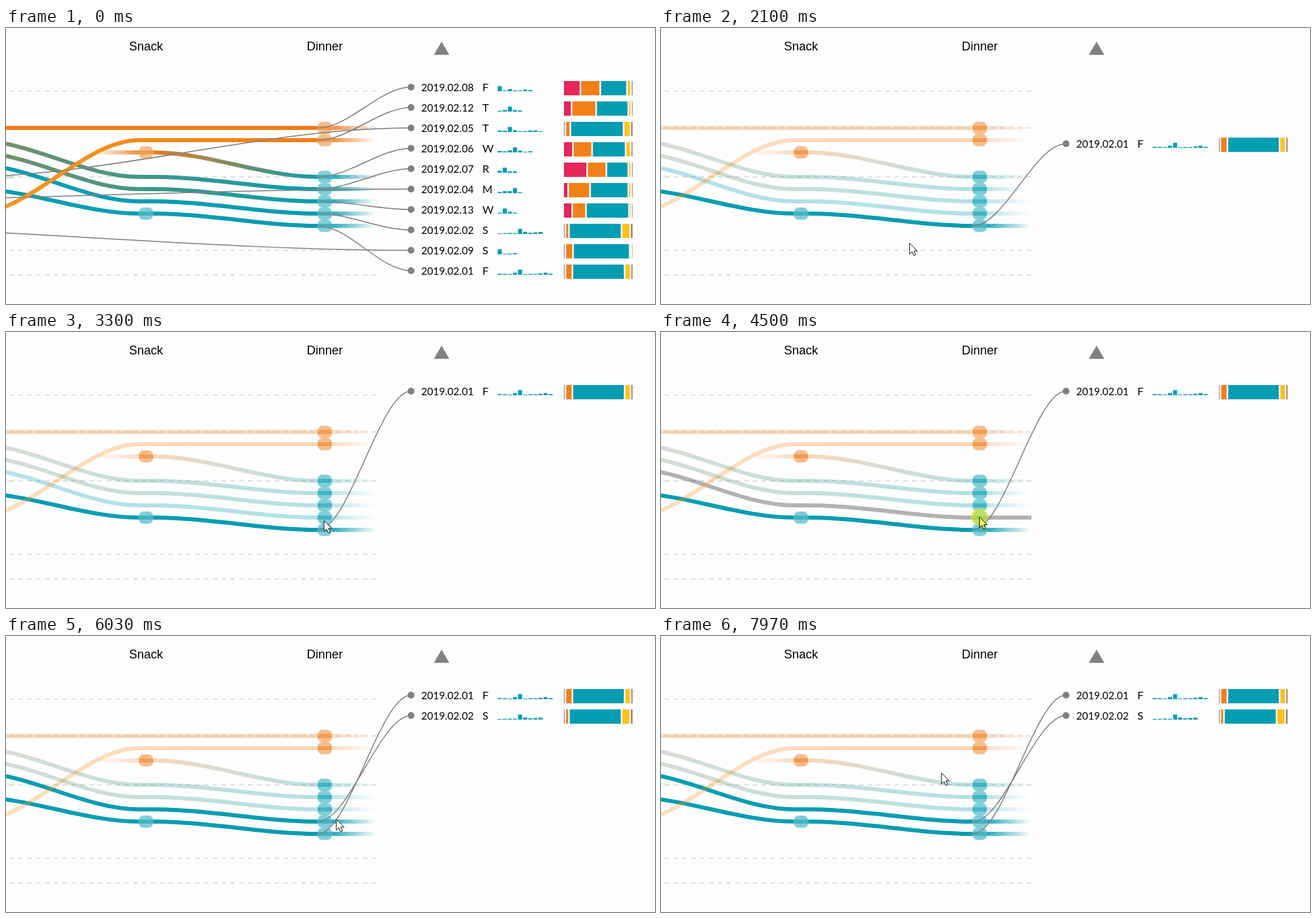
An HTML page for the animation above (8000 ms loop, 955 px wide and 406 px high).

```html
<!DOCTYPE html>
<html lang="en">
<head>
<meta charset="utf-8">
<title>Meal flows</title>
<style>
html, body { margin: 0; width: 100%; height: 100%; overflow: hidden; background: #fefefe; }
svg { display: block; width: 955px; height: 406px; }
.head { font: 18px "Liberation Sans", Arial, sans-serif; text-anchor: middle; }
.date { font: 15.1px Lato, sans-serif; }
.day { font: 16px Lato, sans-serif; }
.flow { fill: none; stroke-width: 6; }
.link { fill: none; stroke: #808080; stroke-width: 1.5; }
.grid { stroke: #e0e0e0; stroke-width: 2; stroke-dasharray: 7 6; }
</style>
</head>
<body>
<svg id="stage" viewBox="0 0 955 406" xmlns="http://www.w3.org/2000/svg"></svg>
<script>
const LOOP = 8000;
const TEAL = '#039db1', ORANGE = '#f07d1a', OLIVE = '#7d9062', AMBER = '#f7991c', GREY = '#808080';
const FADE = 76, HALF = 10;
const [MORNING, LUNCH, SNACK, DINNER] = [0, 1, 2, 3];
const colX = i => -320 + 263 * i;
const slotY = k => 93 + 18 * k;
const rowY = i => 87 + 30 * i;
const stage = document.getElementById('stage');

function add(parent, tag, attrs = {}, text) {
  const el = document.createElementNS('http://www.w3.org/2000/svg', tag);
  for (const k in attrs) el.setAttribute(k, attrs[k]);
  if (text) el.textContent = text;
  parent.appendChild(el);
  return el;
}
const clamp = v => Math.max(0, Math.min(1, v));
const ramp = (t, from, to) => clamp((t - from) / (to - from));
const smooth = u => u * u * (3 - 2 * u);
const cubic = u => u < .5 ? 4 * u ** 3 : 1 - 4 * (1 - u) ** 3;
// A bezier that follows smooth() exactly
const bend = (x0, y0, x1, y1) => {
  const d = (x1 - x0) / 3;
  return `C${x0 + d},${y0} ${x1 - d},${y1} ${x1},${y1}`;
};

// One day per row: date, first column, slot per column, colours at both ends,
// widths of the stacked bar, number of small bars and which is the tallest
const days = [
  ['02.08', LUNCH, [3, 3, 3], ORANGE, ORANGE, [23, 27, 37], 7, 0],
  ['02.12', LUNCH, [10, 4, 4], AMBER, ORANGE, [10, 34, 45], 5, 2],
  ['02.05', LUNCH, [7], TEAL, TEAL, [1, 5, 76], 9, 2],
  ['02.06', SNACK, [5, 7], ORANGE, TEAL, [12, 26, 47], 7, 3],
  ['02.07', LUNCH, [4, 7, 8], OLIVE, TEAL, [33, 26, 30], 4, 1],
  ['02.04', MORNING, [9], TEAL, TEAL, [5, 30, 54], 5, 3],
  ['02.13', LUNCH, [5, 8, 9], OLIVE, TEAL, [11, 18, 61], 4, 1],
  ['02.02', LUNCH, [6, 9, 10], TEAL, TEAL, [1, 3, 75], 9, 4],
  ['02.09', MORNING, [11], TEAL, TEAL, [1, 9, 81], 4, 0],
  ['02.01', LUNCH, [8, 10, 11], TEAL, TEAL, [1, 8, 74.5], 11, 4]
].map(([date, first, slots, head, tail, parts, count, peak], i) =>
  ({ date, first, ys: slots.map(slotY), head, tail, parts, count, peak, home: rowY(i) }));

const defs = add(stage, 'defs');
[SNACK, DINNER].forEach((c, i) =>
  add(stage, 'text', { class: 'head', x: colX(c), y: 33 }, ['Snack', 'Dinner'][i]));
add(stage, 'path', { d: 'M641 20L652.3 39.5H629.5Z', fill: GREY });
for (const k of [0, 3, 7, 13, 15]) add(stage, 'path', { class: 'grid', d: `M5 ${slotY(k)}H551` });

function makeFlow(day, i) {
  const { first, ys, head, tail } = day;
  const last = first + ys.length - 1;
  const x0 = colX(first) - (first === SNACK ? FADE : HALF), x1 = colX(last) + FADE;
  const id = 'flow' + i;
  const g = add(defs, 'linearGradient', { id, gradientUnits: 'userSpaceOnUse', x1: x0, x2: x1, y1: 0, y2: 0 });
  const stop = (x, color, alpha) =>
    add(g, 'stop', { offset: (x - x0) / (x1 - x0), 'stop-color': color, 'stop-opacity': alpha });
  if (first === SNACK) stop(x0, head, 0);
  stop(colX(first), head, 1);
  stop(colX(last), tail, 1);
  stop(x1, tail, 0);

  let d = `M${x0} ${ys[0]}`;
  ys.forEach((y, k) => {
    const x = colX(first + k);
    if (k) d += bend(colX(first + k - 1) + HALF, ys[k - 1], x - HALF, y);
    d += `H${x + HALF}`;
  });
  day.paint = `url(#${id})`;
  day.flow = add(stage, 'path', { class: 'flow', d: d + `H${x1}`, stroke: day.paint });
  day.end = [colX(last) - HALF, ys[ys.length - 1]];
  day.at = x => {
    if (x < x0 || x > x1) return -99;
    return ys.reduce((y, next, k) =>
      y + (next - y) * smooth(ramp(x, colX(first + k - 1) + HALF, colX(first + k) - HALF)));
  };
}
days.forEach(makeFlow);
stage.appendChild(days[1].flow);

function node(col, slot) {
  const x = colX(col) - 10.5, y = slotY(slot), fill = slot < 6 ? ORANGE : TEAL;
  const box = { x, y: y - 9, width: 21, height: 18, rx: 7 };
  add(stage, 'rect', { ...box, fill: '#fefefe' });
  add(stage, 'rect', { ...box, fill, opacity: .5 });
  add(stage, 'rect', { x, y: y - 3, width: 21, height: 6, fill, opacity: .5 });
}
for (const k of [5, 10]) node(SNACK, k);
for (const k of [3, 4, 7, 8, 9, 10, 11]) node(DINNER, k);

let seed = 7;
const random = () => (seed = seed * 16807 % 2147483647) / 2147483647;

function makeRow(day) {
  const { date, parts, count, peak } = day;
  const weekday = new Date(`2019-${date.replace('.', '-')}T00:00Z`).getUTCDay();
  day.row = add(stage, 'g');
  day.link = add(day.row, 'path', { class: 'link' });
  day.box = add(day.row, 'g');
  const rect = (x, y, width, height, fill) => add(day.box, 'rect', { x, y, width, height, fill });
  add(day.box, 'circle', { cx: 596, r: 5, fill: GREY });
  add(day.box, 'text', { class: 'date', x: 611, y: 6 }, '2019.' + date);
  add(day.box, 'text', { class: 'day', x: 701, y: 6 }, 'SMTWRFS'[weekday]);
  for (let k = 0; k < count; k++) {
    const h = k === peak ? 7.5 : 1 + 2.5 * random() ** 2;
    rect(723.5 + k * 7.5, 6 - h, 6, h, TEAL);
  }
  const gap = 2.3;
  const rest = 101 - 4 * gap - parts.reduce((a, b) => a + b);
  const tip = .5 + .15 * rest;
  const colors = [parts[0] > 1 ? '#e4265a' : '#a07488', '#f28018', TEAL, '#fdc31c', '#a87a68'];
  let x = 821;
  [...parts, Math.max(.3, rest - tip), tip].forEach((w, k) => {
    rect(x, -9, w, 21, colors[k]);
    x += w + gap;
  });
}
days.forEach(makeRow);

function placeRow(day, y, alpha) {
  const [x0, y0] = day.end;
  day.row.setAttribute('opacity', alpha);
  day.box.setAttribute('transform', `translate(0 ${y})`);
  day.link.setAttribute('d', `M${x0} ${y0}` + bend(x0, y0, 596, y));
}

const glow = add(stage, 'circle', { r: 12.5, fill: '#e0e820', 'fill-opacity': .65 });
const cursor = add(stage, 'path', {
  d: 'M0 0V16L3.8 12.5L6.3 18.3L9 17.1L6.5 11.5H11.5Z', stroke: '#111'
});

// Pointer moves: start time, end time, where to
const moves = [
  [600, 900, 363.5, 311.5], [1050, 1130, 366, 299.5], [1290, 1510, 368, 283.5],
  [1900, 2100, 365.5, 316.5], [2100, 2530, 457, 323], [2740, 2840, 454, 315.5],
  [2970, 3300, 468, 277.5], [3480, 3760, 468.5, 272], [6020, 6030, 486, 269.6],
  [6080, 6770, 428, 147], [7040, 7230, 421, 165], [7640, 7960, 412.8, 201.5]
];
const pointer = t => moves.reduce(([x, y], [t0, t1, x1, y1]) => {
  const u = ramp(t, t0, t1);
  return [x + (x1 - x) * u, y + (y1 - y) * u];
}, [431, 408]);

function draw(t) {
  const [px, py] = pointer(t);
  const click = [1790, 4500].some(c => t >= c && t < c + 90);
  for (const el of [cursor, glow]) el.setAttribute('transform', `translate(${px} ${py})`);
  cursor.setAttribute('fill', click ? '#ffff50' : '#fff');
  glow.setAttribute('opacity', click ? 1 : 0);

  const away = 1 - ramp(t, 1900, 2010);
  const back = ramp(t, 4600, 5000);
  const rise = cubic(ramp(t, 1900, 2250));
  for (const day of days) {
    const lead = day.date === '02.01', second = day.date === '02.02';
    const shown = lead ? 1 : second ? Math.max(away, back) : away;
    const hover = Math.abs(day.at(px) - py) < 3.2;
    day.flow.setAttribute('stroke', hover ? '#000' : day.paint);
    day.flow.setAttribute('opacity', .3 + .7 * shown);
    const y = lead ? day.home + (rowY(0) - day.home) * rise
      : second && t > 3000 ? rowY(1) : day.home;
    placeRow(day, y, shown);
  }
}

const begin = performance.now();
function tick(now) {
  draw(Math.max(0, now - begin) % LOOP);
  requestAnimationFrame(tick);
}
draw(0);
requestAnimationFrame(tick);
</script>
</body>
</html>
```
